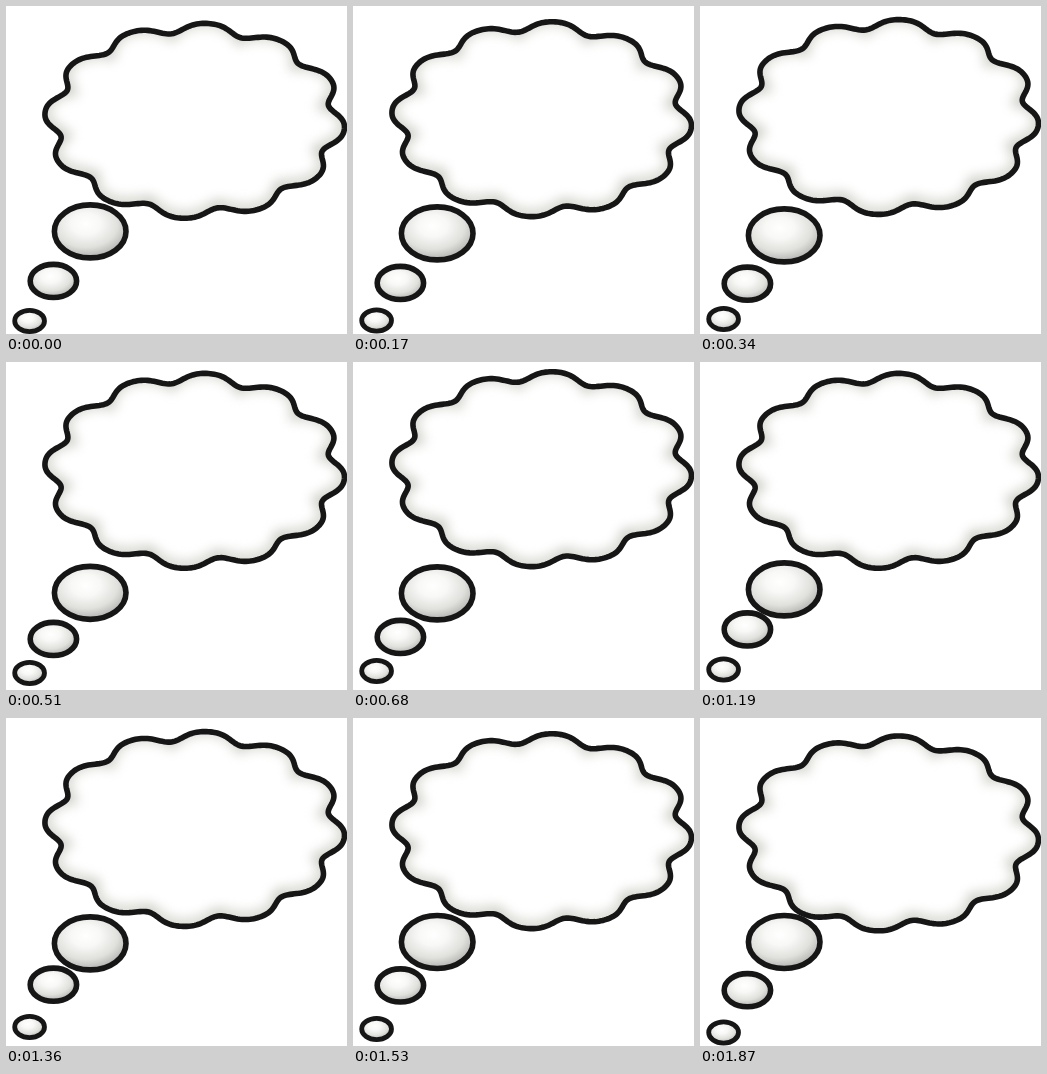
These frames come from a looping animation (341x328 px, 2040 ms). An HTML page:

```html
<!DOCTYPE html>
<html>
<head>
<meta charset="utf-8">
<style>
html, body { margin: 0; width: 100%; height: 100%; overflow: hidden; background: #fff; }
svg { display: block; width: 341px; height: 328px; }
.line { fill: none; stroke: #161616; stroke-width: 5.6; }
.ball { fill: url(#shade); stroke: #161616; stroke-width: 5.6; }
</style>
</head>
<body>
<svg viewBox="0 0 341 328">
  <defs>
    <radialGradient id="shade" cx=".44" cy=".36" r=".68">
      <stop offset="0" stop-color="#fff"/>
      <stop offset=".3" stop-color="#f8f8f6"/>
      <stop offset=".65" stop-color="#e0e0dd"/>
      <stop offset="1" stop-color="#a8a8a6"/>
    </radialGradient>
    <filter id="blur" x="-20%" y="-20%" width="140%" height="140%" color-interpolation-filters="sRGB">
      <feGaussianBlur stdDeviation="6"/>
    </filter>
    <path id="outline"/>
    <clipPath id="inside"><use href="#outline"/></clipPath>
  </defs>
  <g id="cloud">
    <use href="#outline" fill="#fff"/>
    <g clip-path="url(#inside)">
      <g filter="url(#blur)" fill="none">
        <use href="#outline" y="-2" stroke="#d4d4cd" stroke-width="11"/>
        <path id="creases" stroke="#b8b8b0" stroke-width="9" opacity=".6"/>
      </g>
    </g>
    <use href="#outline" class="line"/>
  </g>
  <ellipse id="large" class="ball" cx="84.2" rx="35.8" ry="26.5"/>
  <ellipse id="medium" class="ball" cx="47.4" rx="23.2" ry="16.6"/>
  <ellipse id="small" class="ball" cx="23.6" rx="14.9" ry="10.6" style="stroke-width:4.8"/>
</svg>
<script>
const STEP = 170, STEPS = 12;
const LOBES = 12, TILT = 5 * Math.PI / 180;
const $ = id => document.getElementById(id);

// Point on the cloud's ellipse at angle u, scaled by r
const at = (u, r) => (150.2 * r * Math.cos(u)).toFixed(2) + ',' + (97.7 * r * Math.sin(u)).toFixed(2);

function scallops() {
  const pts = [];
  for (let i = 0; i < 480; i++) {
    const u = i * Math.PI / 240, w = LOBES * (u - TILT);
    pts.push(at(u, 0.959 + 0.048 * Math.cos(w) - 0.007 * Math.cos(2 * w)));
  }
  return 'M' + pts.join('L') + 'Z';
}

// Soft folds running inwards from each notch
function creases() {
  let d = '';
  for (let i = 0; i < LOBES; i++) {
    const u = TILT + (i + 0.5) * 2 * Math.PI / LOBES;
    d += 'M' + at(u, 0.92) + 'L' + at(u, 0.83);
  }
  return d;
}

function draw() {
  const k = Math.floor(performance.now() / STEP) % STEPS;
  // Vertical bob: lowest at step `low`
  const bob = (mid, amp, low) => mid + amp * Math.cos(2 * Math.PI * (k - low) / STEPS);
  $('cloud').setAttribute('transform', `translate(188.7 ${bob(111, 4.4, 11)})`);
  $('large').setAttribute('cy', bob(227.4, 4, 4));
  $('medium').setAttribute('cy', bob(272.2, 5.5, 2));
  $('small').setAttribute('cy', bob(311, 4, 0));
  requestAnimationFrame(draw);
}

$('outline').setAttribute('d', scallops());
$('creases').setAttribute('d', creases());
draw();
</script>
</body>
</html>
```
